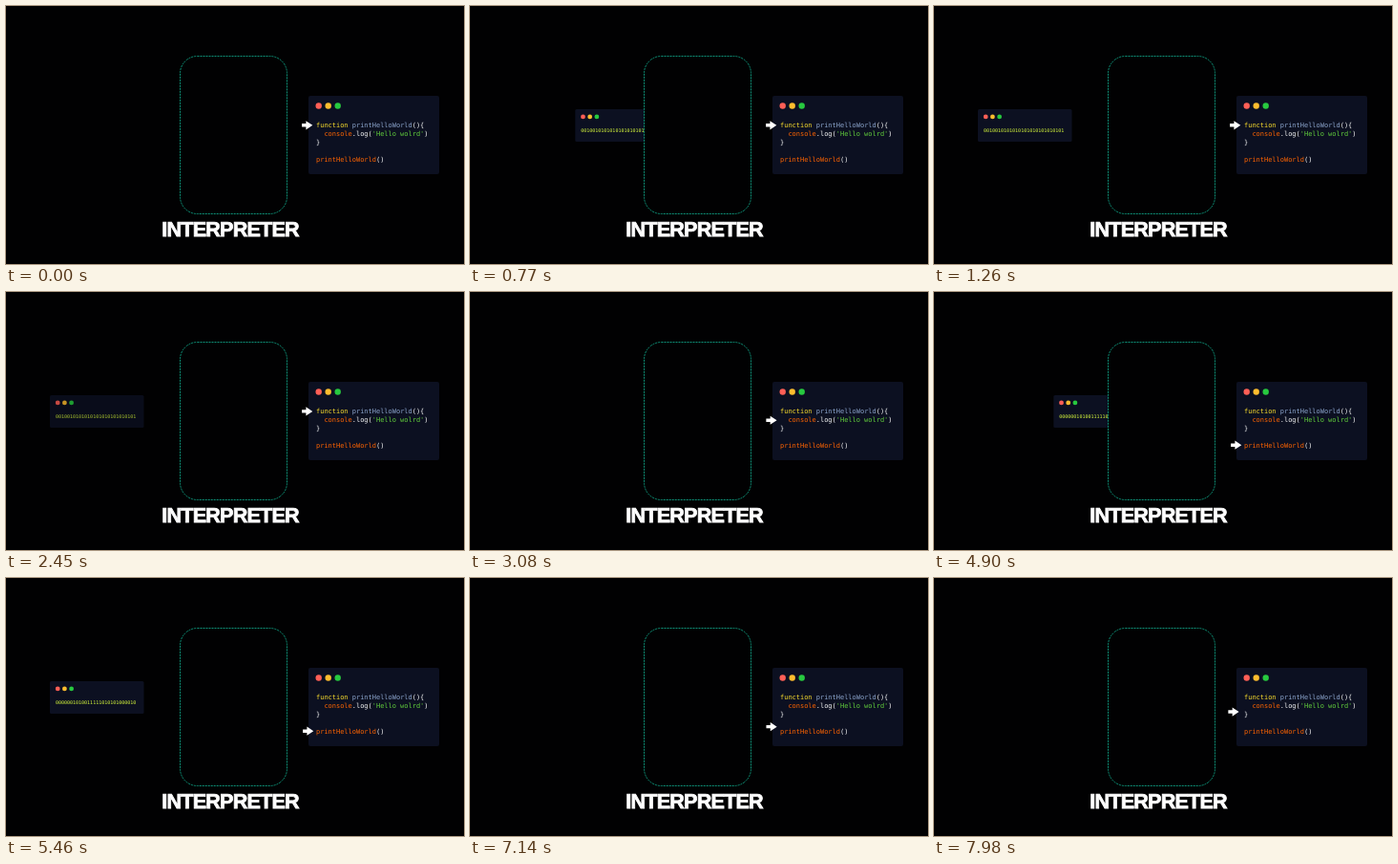
These frames come from a looping animation (480 px wide and 270 px high, 8000 ms). An HTML page:

```html
<!DOCTYPE html>
<html lang="en">
<head>
<meta charset="utf-8">
<title>Interpreter</title>
<style>
  html, body { margin: 0; width: 100%; height: 100%; overflow: hidden; background: #010102; }
  svg { display: block; width: 100vw; height: 100vh; }
  text { white-space: pre; text-rendering: geometricPrecision; }
  .code { font: 6.98px "DejaVu Sans Mono", monospace; fill: #f8f8f8; }
  .bits { font: 5px "DejaVu Sans Mono", monospace; fill: #d8fa3c; }
  .title { font: bold 21.6px "Liberation Sans", Arial, sans-serif; fill: #fff; stroke: #fff; stroke-width: .8; letter-spacing: -.8px; }
  .window { fill: #0c1021; }
  .key { fill: #fbde2d; }
  .def { fill: #8da6ce; }
  .var { fill: #ff6400; }
  .str { fill: #61ce3c; }
  .red { fill: #ff5f56; }
  .amber { fill: #ffbd2e; }
  .green { fill: #27c93f; }
</style>
</head>
<body>
<svg viewBox="0 0 480 270">
  <rect width="480" height="270" fill="#010102"/>

  <g id="output">
    <rect class="window" y="108" width="98.5" height="34" rx="1.5"/>
    <circle class="red" cx="8.2" cy="115.9" r="2.4"/>
    <circle class="amber" cx="15.4" cy="115.9" r="2.4"/>
    <circle class="green" cx="22.6" cy="115.9" r="2.4"/>
    <text id="bits" class="bits" x="6" y="132.4"></text>
  </g>

  <rect x="182.5" y="52.5" width="112" height="165" rx="18" fill="#010102"
        stroke="#0f9b80" stroke-width=".95" stroke-dasharray="2 1"/>
  <text class="title" x="163.3" y="241.3">INTERPRETER</text>

  <rect class="window" x="317" y="94" width="137" height="82" rx="2"/>
  <circle class="red" cx="327.7" cy="104.5" r="3.2"/>
  <circle class="amber" cx="337.7" cy="104.5" r="3.2"/>
  <circle class="green" cx="347.7" cy="104.5" r="3.2"/>
  <g class="code">
    <text x="325" y="127.2"><tspan class="key">function</tspan> <tspan class="def">printHelloWorld</tspan>(){</text>
    <text x="333.4" y="136.1"><tspan class="var">console</tspan>.log(<tspan class="str">'Hello wolrd'</tspan>)</text>
    <text x="325" y="144.9">}</text>
    <text x="325" y="162.7"><tspan class="var">printHelloWorld</tspan>()</text>
  </g>

  <path id="arrow" d="M0-1.7H4.3V-4.6L11.2 0L4.3 4.6V1.7H0Z" fill="#fff"/>
</svg>
<script>
  const LOOP = 8000;
  const CYCLE = 4200;
  const [output, bits, arrow] = ['output', 'bits', 'arrow'].map(id => document.getElementById(id));
  const words = ['0010010101010101010101010101', '0000001010011111010101000010'];

  const progress = (t, start, length) => Math.min(1, Math.max(0, (t - start) / length));
  const ease = p => (1 - Math.cos(Math.PI * p)) / 2;
  const mix = (a, b, p) => a + (b - a) * p;
  const move = (el, x, y) => el.setAttribute('transform', `translate(${x.toFixed(3)} ${y.toFixed(3)})`);

  function draw(t) {
    // The output window slides out, rests, fades, then returns with the next word.
    const turn = t < CYCLE ? 0 : 1;
    const local = t - turn * CYCLE;
    bits.textContent = words[turn];
    move(output, mix(190, 46, ease(progress(local, 210, 1050))), 0);
    output.setAttribute('opacity', 1 - progress(local, 2340, 500));

    // The arrow steps to the call, then up into the function body.
    const down = ease(progress(t, 2380, 2030));
    const up = ease(progress(t, 6580, 2030));
    move(arrow, 310.1 + down - 3.5 * up, 124.8 + 35.4 * down - 25.8 * up);
  }

  const start = performance.now();
  function tick() {
    draw((performance.now() - start) % LOOP);
    requestAnimationFrame(tick);
  }
  draw(0);
  tick();
</script>
</body>
</html>
```
